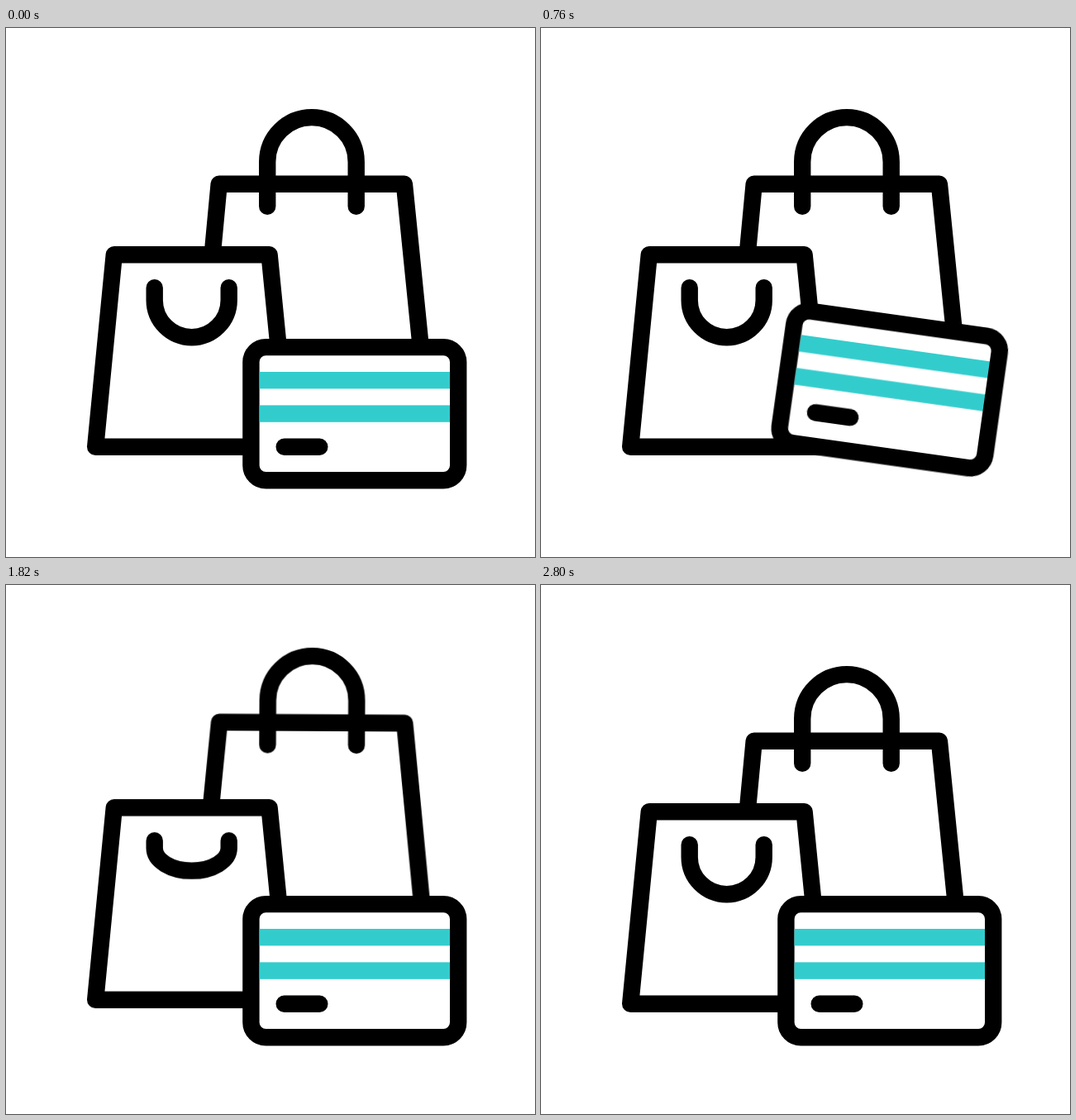
An HTML page for the animation above (2820 ms loop, 640x640 px).

```html
<!DOCTYPE html>
<html lang="en">
<head>
<meta charset="utf-8">
<title>Shopping</title>
<style>
  html, body { margin: 0; width: 100%; height: 100%; overflow: hidden; background: #fff; }
  svg { display: block; width: 100%; height: 100%; }

  .line {
    fill: none;
    stroke: #000;
    stroke-width: 20.4;
    stroke-linecap: round;
    stroke-linejoin: round;
  }
  .solid { fill: #fff; }
  .stripe { fill: #3cc; }

  .lift, .tilt, .handle {
    animation: 2820ms cubic-bezier(.33333, 0, .66667, 1) var(--wait) infinite;
  }
  .lift { animation-name: lift; }
  .tilt { animation-name: tilt; transform-origin: var(--pivot); }
  .handle { animation-name: flip; }

  .card { --wait: 0ms; --rise: -51px; --pivot: 421.8px 466.6px; }
  .small { --wait: 800ms; --rise: -38.35px; --pivot: 224.8px 390.5px; }
  .large { --wait: 1600ms; --rise: -38.35px; --pivot: 370px 270px; }

  /* Each part moves for 1200 ms of the loop, in steps of 200 ms (7.0922%). */
  @keyframes lift {
    0%, 42.5532%, 100% { transform: translateY(0); }
    14.1844% { transform: translateY(var(--rise)); }
  }
  @keyframes tilt {
    0%, 7.0922%, 35.461%, 100% { transform: rotate(0deg); }
    14.1844%, 28.3688% { transform: rotate(10deg); }
    21.2766% { transform: rotate(-10deg); }
  }
  @keyframes flip {
    0%, 7.0922%, 42.5532%, 100% {
      d: path("M179.7 314.2 L179.7 329.2 C179.7 354.1 199.9 374.2 224.7 374.2 C249.5 374.2 269.7 354.1 269.7 329.2 L269.7 314.2");
    }
    21.2766% {
      d: path("M179.7 314.2 L179.7 301.7 C179.7 280.9 199.9 264.1 224.7 264.1 C249.5 264.1 269.7 280.9 269.7 301.7 L269.7 314.2");
    }
  }
</style>
</head>
<body>
<svg viewBox="0 0 640 640">
  <g class="large">
    <g class="lift"><g class="tilt">
      <path class="line" d="M231.5 468 L257.7 188.8 H481.9 L510 468"/>
      <path class="line" d="M316.2 215.7 V161.9 A53.75 53.75 0 0 1 423.7 161.9 V215.7"/>
    </g></g>
  </g>

  <g class="small">
    <g class="lift"><g class="tilt">
      <path class="line solid" d="M130.8 274.2 H318.6 L341.6 506.8 H108.2 Z"/>
      <path class="line handle" d="M179.7 314.2 L179.7 329.2 C179.7 354.1 199.9 374.2 224.7 374.2 C249.5 374.2 269.7 354.1 269.7 329.2 L269.7 314.2"/>
    </g></g>
  </g>

  <g class="card">
    <g class="lift"><g class="tilt">
      <rect class="line solid" x="296.4" y="386.1" width="250.8" height="161.1" rx="18"/>
      <rect class="stripe" x="306.6" y="416" width="230.4" height="20.4"/>
      <rect class="stripe" x="306.6" y="456.4" width="230.4" height="20.4"/>
      <path class="line" d="M336.7 506.8 H379.3"/>
    </g></g>
  </g>
</svg>
</body>
</html>
```
